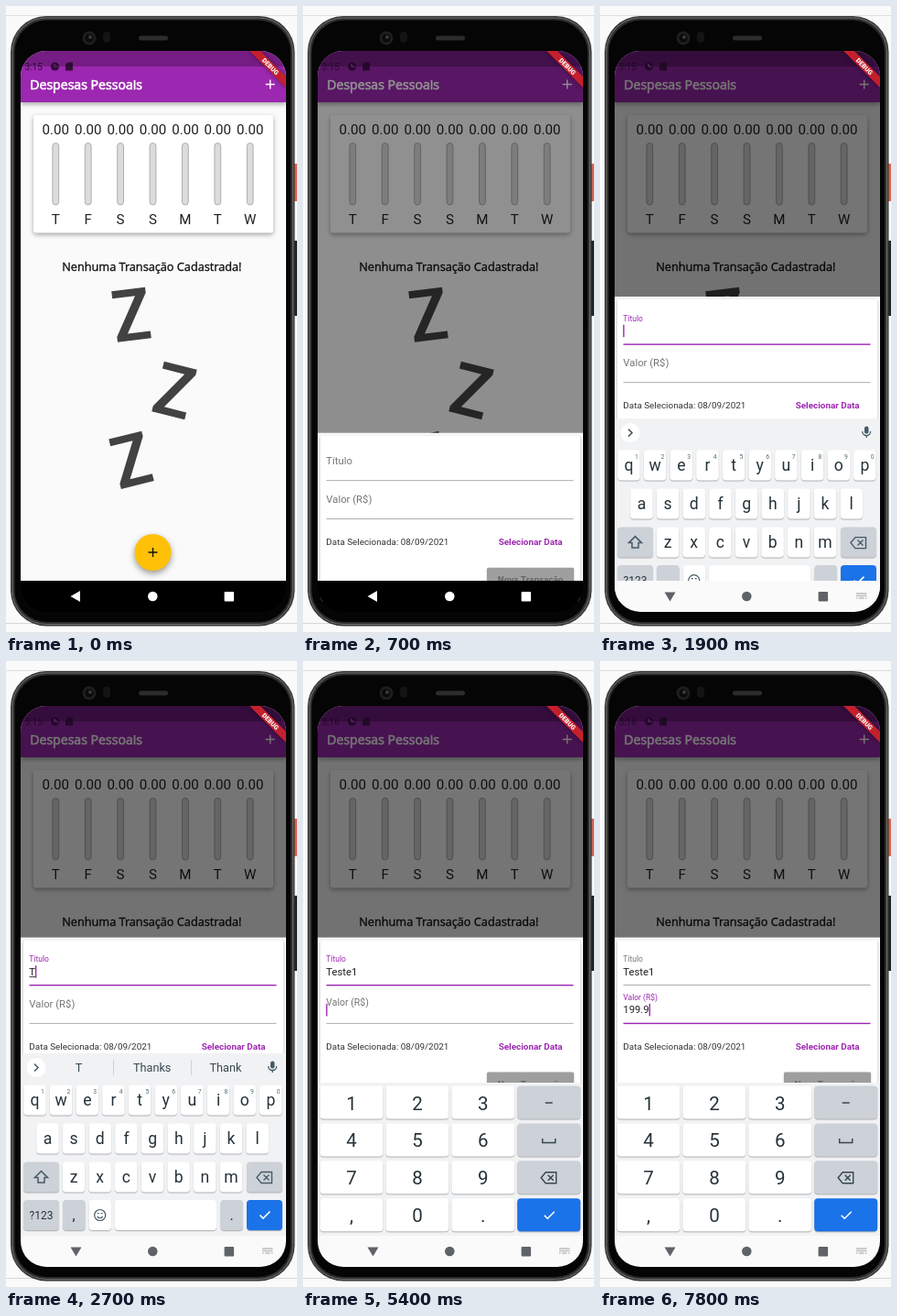
An HTML page with a canvas for the animation above (8000 ms loop, 318x684 px).

```html
<!DOCTYPE html>
<html lang="pt">
<head>
<meta charset="utf-8">
<title>Despesas Pessoais</title>
<style>
html, body { margin: 0; width: 100%; height: 100%; overflow: hidden; background: #fafafa; }
canvas { display: block; width: 318px; height: 684px; }
</style>
</head>
<body>
<canvas id="stage"></canvas>
<script>
const LOOP = 8000, STEP = 100;
const PURPLE = '#9c27b0', GREY = '#757575', INK = '#212121', KEY_INK = '#263238', BLUE = '#1a73e8';
const ROBOTO = 'Roboto, sans-serif', OPEN = '"Open Sans", sans-serif';
const cv = document.getElementById('stage'), c = cv.getContext('2d');
const dpr = window.devicePixelRatio || 1;
cv.width = 318 * dpr;
cv.height = 684 * dpr;

const clamp = v => Math.max(0, Math.min(1, v));
const mix = (a, b, p) => a + (b - a) * p;
const easeOut = (p, n) => 1 - (1 - clamp(p)) ** n;
// Last value whose start time has passed
const at = (list, t) => list.reduce((v, [start, next]) => t >= start ? next : v, list[0][1]);

function rect(x, y, w, h, fill) {
  c.fillStyle = fill;
  c.fillRect(x, y, w, h);
}
function box(x, y, w, h, r, fill, stroke, lw = 1) {
  c.beginPath();
  c.roundRect(x, y, w, h, r);
  if (fill) { c.fillStyle = fill; c.fill(); }
  if (stroke) { c.strokeStyle = stroke; c.lineWidth = lw; c.stroke(); }
}
function disc(x, y, r, fill) {
  c.beginPath();
  c.arc(x, y, r, 0, 7);
  c.fillStyle = fill;
  c.fill();
}
function shadow(blur, dy, alpha, draw) {
  c.save();
  c.shadowColor = `rgba(0,0,0,${alpha})`;
  c.shadowBlur = blur * dpr;
  c.shadowOffsetY = dy * dpr;
  draw();
  c.restore();
}
function text(s, x, y, size, fill, { align = 'left', weight = 400, font = ROBOTO, thick = 0 } = {}) {
  c.font = `${weight} ${size}px ${font}`;
  c.textAlign = align;
  c.fillStyle = fill;
  c.fillText(s, x, y);
  if (thick) {
    c.strokeStyle = fill;
    c.lineWidth = thick;
    c.strokeText(s, x, y);
  }
}
const mid = (s, x, y, size, fill, weight) => text(s, x, y, size, fill, { align: 'center', weight });
// Path placed at x, y: filled, or stroked when a line width is given
function icon(d, x, y, color, lw) {
  c.save();
  c.translate(x, y);
  const p = new Path2D(d);
  c.fillStyle = c.strokeStyle = color;
  c.lineWidth = lw;
  lw ? c.stroke(p) : c.fill(p);
  c.restore();
}
const plus = (x, y, color) => icon('M-5 0H5M0-5V5', x, y, color, 1.4);

function phone() {
  rect(0, 0, 318, 684, '#fafafa');
  rect(0, 10, 318, 1, '#dedede');
  rect(0, 673, 318, 1, '#d6d6d6');
  rect(0, 683, 318, 1, '#e4e4e4');
  rect(314, 172, 4, 41, '#d9654f');
  rect(314, 256, 4, 82, '#222');
  box(5, 11, 310.500, 665.500, 39, '#383838');
  box(7, 13, 306.500, 661.500, 37, '#2e2e2e', '#6e6e6e');
  box(9.500, 15.500, 301.500, 656.500, 35, '#050505');
  disc(91, 35, 7.5, '#1e1e1e');
  disc(91, 35, 4.5, '#0a0a0a');
  disc(92, 34, 2, '#3a3a3a');
  box(106, 28, 8, 12, 4, '#141414');
  box(145, 32.5, 32, 5, 2.5, '#2c2c2c');
}

function letterZ(x, y, deg) {
  c.save();
  c.translate(x, y);
  c.rotate(deg * Math.PI / 180);
  icon('M-18.500-28H18.500V-22L-6.500 20H18.500V28H-18.500V22L6.500-20H-18.500Z', 0, 0, '#424242');
  c.restore();
}

function app() {
  rect(16, 49, 290, 578, '#fafafa');
  shadow(5, 2, .35, () => rect(16, 49, 290, 56, PURPLE));
  rect(16, 49, 290, 17, 'rgba(0,0,0,.25)');
  text('Despesas Pessoais', 26.200, 91, 14.1, '#fff', { font: OPEN, thick: .65 });
  plus(288.700, 85.500, '#fff');

  shadow(5, 2, .35, () => box(30, 119, 262, 128.500, 3, '#fff'));
  [...'TFSSMTW'].forEach((day, i) => {
    const x = 54.300 + i * 35.400;
    mid('0.00', x, 140, 15.1, INK);
    box(x - 3.400, 149.500, 6.800, 67.500, 3.400, '#dcdcdc', '#9e9e9e', .8);
    mid(day, x, 237.500, 15.1, INK);
  });

  text('Nenhuma Transação Cadastrada!', 61.300, 289, 12.7, '#111', { font: OPEN, thick: .35 });
  letterZ(137, 336.800, -7);
  letterZ(184, 419.500, 14);
  letterZ(137, 495.300, -14);

  shadow(7, 3, .4, () => disc(160.500, 596, 20, '#ffc107'));
  plus(160.500, 596, '#111');
}

// Text field whose label shrinks upwards as p goes from 0 to 1
function field(label, y, p, focused, value, cursor, composing) {
  const color = focused ? PURPLE : GREY;
  text(label, 25.300, mix(y - 17, y - 25, p), mix(11.3, 8.5, p), color);
  if (focused) rect(25.500, y - .2, 270, 1.4, PURPLE);
  else rect(25.500, y, 270, .8, '#999');
  text(value, 25.300, y - 10.500, 11.3, INK);
  const w = c.measureText(value).width;
  if (composing) rect(25.500, y - 9, w, .9, INK);
  if (cursor) rect(25.200 + w, y - 21, 1.4, 13.500, PURPLE);
}

function sheet(t, top) {
  rect(16, top, 290, 627 - top, '#fafafa');
  shadow(3, 1, .3, () => box(19, top + 3, 284, 181, 3, '#fff'));

  const title = at([[0, ''], [2400, 'T'], [2900, 'Te'], [3100, 'Tes'], [3400, 'Test'], [3600, 'Teste'], [4900, 'Teste1']], t);
  const value = at([[0, ''], [6300, '1'], [6700, '19'], [6900, '199'], [7400, '199.'], [7800, '199.9']], t);
  const onTitle = t >= 1400 && t < 5500;
  const titleCursor = t >= 1600 && t < 5400 && !(t >= 4000 && t < 4400);
  const valueCursor = t >= 5400 && !(t >= 5800 && t < 6300) && t !== 7300;
  field('Título', top + 51.600, clamp((t - 1300) / 300), onTitle, title, titleCursor, t < 4900 && title);
  field('Valor (R$)', top + 93.300, clamp((t - 5360) / 140), t >= 5500, value, valueCursor);

  text('Data Selecionada: 08/09/2021', 25.300, top + 122, 9.9, '#333');
  text('Selecionar Data', 213.700, top + 122, 9.9, PURPLE, { weight: 700 });
  shadow(2, 1, .3, () => box(201, top + 147, 95, 25, 1.5, '#9e9e9e'));
  mid('Nova Transação', 248.500, top + 163.500, 9.9, '#666', 700);
}

function key(x, y, w, h, fill = '#fff') {
  shadow(1, 1, .28, () => box(x, y, w, h, 4, fill));
}
const ICONS = {
  shift: ['M0-7L-7 0H-3.500V5.500H3.500V0H7Z', 1.5],
  back: ['M-3.500-6H8V6H-3.500L-8.500 0ZM-1-3L5 3M5-3L-1 3', 1.4],
  check: ['M-5 0L-1.500 3.500L6-4', 1.6],
  space: ['M-7-2V2.500H7V-2', 1.5],
  minus: ['M-4 0H4', 1.4],
  smile: ['M6 0A6 6 0 1 1-6 0A6 6 0 1 1 6 0M-3 1.500Q0 5 3 1.500M-3-2h2M1-2h2', 1.2]
};
function sign(name, x, y, color = '#455a64') {
  const [d, lw] = ICONS[name];
  icon(d, x, y, color, lw);
}
const KEY_GREY = '#cdd1d8', BOARD = '#f1f2f4';

function letterBoard(t) {
  rect(16, 428, 290, 199, BOARD);
  disc(33, 443.500, 10.500, '#fff');
  icon('M-2-4L2 0L-2 4', 33, 443.500, '#455a64', 1.5);
  const words = at([[0, ''], [2500, 'T Thanks Thank'], [2900, 'Te The Tea'], [3100, 'Tes Test Tea'],
    [3400, 'Test Tests Testing'], [3600, 'Teste Tested Tester'], [5000, '']], t);
  if (words) {
    words.split(' ').forEach((w, i) => mid(w, 79.500 + i * 80.200, 448, 12.7, '#37474f'));
    rect(117, 435, 1, 17, '#cfd4d8');
    rect(202, 435, 1, 17, '#cfd4d8');
  }
  box(289, 436.500, 4.500, 8, 2.200, '#455a64');
  icon('M-4.500-1A4.500 4.500 0 0 0 4.500-1M0 3.500V6', 291.200, 443, '#455a64', 1.3);

  [['qwertyuiop', 31.500, 462.500], ['asdfghjkl', 45.500, 504.500], ['zxcvbnm', 74, 546.500]].forEach(([row, x0, y], r) => {
    [...row].forEach((ch, i) => {
      const x = x0 + i * 28.650;
      key(x - 12.300, y, 24.600, 33);
      mid(ch, x, y + 22.500, 17.6, KEY_INK);
      if (!r) mid((i + 1) % 10, x + 8.300, y + 9, 6.800, '#546e7a');
    });
  });
  key(19, 546.500, 39, 33, KEY_GREY);
  sign('shift', 38.500, 563.500);
  key(263, 546.500, 39, 33, KEY_GREY);
  sign('back', 282.500, 563.500);

  key(19, 588, 39, 33, KEY_GREY);
  mid('?123', 38.500, 609, 12, KEY_INK);
  key(62, 588, 24.500, 33, KEY_GREY);
  mid(',', 74, 610, 16, KEY_INK);
  key(90.500, 588, 24.500, 33);
  sign('smile', 102.700, 604.500);
  key(119, 588, 111, 33);
  key(234.500, 588, 24.500, 33, KEY_GREY);
  mid('.', 246.700, 610, 16, KEY_INK);
  key(263, 588, 39, 33, BLUE);
  sign('check', 282.500, 604.500, '#fff');
}

function numberBoard() {
  rect(16, 460, 290, 167, BOARD);
  [...'123-456_789<,0.!'].forEach((ch, i) => {
    const col = i % 4, x = 18.500 + col * 71.900, y = 463.500 + (i >> 2) * 40.900;
    const name = { '-': 'minus', _: 'space', '<': 'back', '!': 'check' }[ch];
    key(x, y, 69, 36, ch === '!' ? BLUE : col === 3 ? KEY_GREY : '#fff');
    if (name) sign(name, x + 34.500, y + 18.500, ch === '!' ? '#fff' : '#37474f');
    else mid(ch, x + 34.500, y + 26, 20.500, KEY_INK);
  });
}

function navBar(t) {
  const light = t >= 1800, color = light ? '#5f6368' : '#fff';
  rect(16, 627, 290, 34, light ? '#fafafa' : '#000');
  icon(light ? 'M-5.500-4.500H6.500L.5 5.500Z' : 'M5-6V6L-5.500 0Z', 76, 644, color);
  disc(160.300, 644, 5.300, color);
  box(238.600, 639, 10.500, 10.500, 1, color);
  if (t >= 1700) icon('M-5.500-3H6M-5.500-.5H6M-5.500 2H-4M-2.500 2H3M4.500 2H6', 285.500, 644, light ? '#b9bcc0' : '#ddd', 1.4);
}

function statusBar(t) {
  const color = 'rgba(25,8,30,.8)';
  text(t < 4900 ? '3:15' : '3:16', 20.500, 70, 10, color);
  disc(53.500, 66, 4.500, color);
  icon('M-.5-3V0H3', 53.500, 66, '#7b2a8b', 1);
  icon('M-1.500-4.500H4V4.500H-4V-2Z', 69, 66, color);
}

function banner() {
  c.save();
  c.translate(306, 49);
  c.rotate(Math.PI / 4);
  shadow(4, 0, .45, () => rect(-28.200, 19.800, 56.400, 8.400, '#c4202c'));
  mid('DEBUG', 0, 26.500, 7, '#fff', 900);
  c.restore();
}

function draw(t) {
  c.setTransform(dpr, 0, 0, dpr, 0, 0);
  phone();
  c.save();
  c.beginPath();
  c.roundRect(16, 49, 290, 612, 28);
  c.clip();
  app();

  const open = easeOut((t - 450) / 350, 1.6);
  const rise = easeOut((t - 1700) / 300, 2);
  if (open) {
    rect(16, 49, 290, 578, `rgba(0,0,0,${.54 * open ** 1.5})`);
    sheet(t, mix(627, 440.600, open) - 139 * rise);
  }
  if (t >= 5300) numberBoard();
  else if (rise) {
    c.save();
    c.translate(0, 199 * (1 - rise));
    letterBoard(t);
    c.restore();
  }
  navBar(t);
  statusBar(t);
  banner();
  c.restore();
}

function frame() {
  const t = performance.now() % LOOP;
  draw(t - t % STEP);
  requestAnimationFrame(frame);
}
frame();
</script>
</body>
</html>
```
